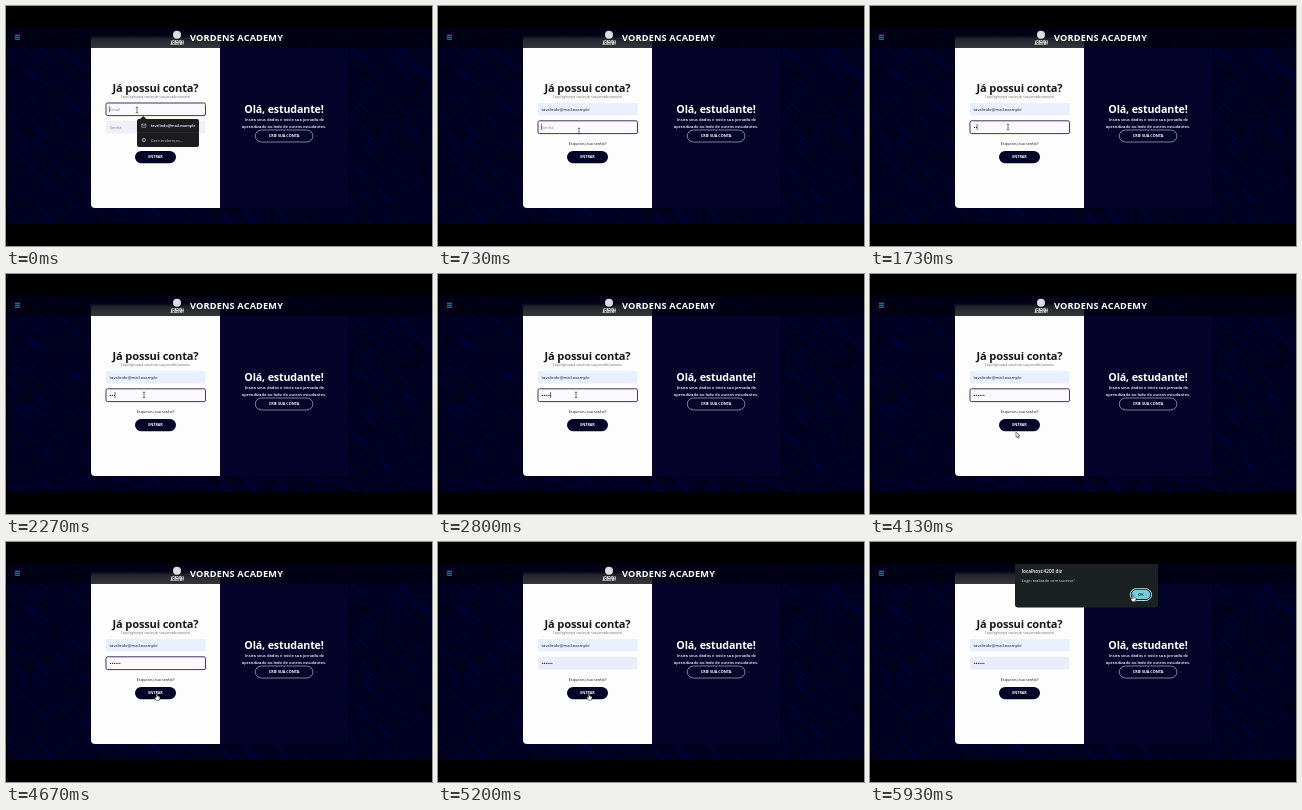
Animation of 426x240 px, one loop 5.99 s. Source, as an HTML page with a canvas:

```html
<!DOCTYPE html>
<html lang="pt">
<head>
<meta charset="utf-8">
<title>Login</title>
<style>
html, body { margin: 0; width: 100%; height: 100%; overflow: hidden; background: #000; }
canvas, svg { position: absolute; left: 0; top: 0; width: 100%; height: 100%; display: block; }
text { font-family: "Open Sans", "Noto Sans", sans-serif; fill: #fff; }
.b { font-weight: 700; }
.s { font-weight: 600; }
.title { font-weight: 700; letter-spacing: -.15px; }
.mid { text-anchor: middle; }
.ink { fill: #16161c; }
.hint { fill: #85858e; }
</style>
</head>
<body>
<canvas id="back" width="426" height="240"></canvas>
<svg viewBox="0 0 426 240" preserveAspectRatio="none">
  <defs>
    <linearGradient id="veil" x2="0" y2="1">
      <stop offset="0" stop-color="#24242c" stop-opacity="0"/>
      <stop offset=".3" stop-color="#24242c"/>
      <stop offset="1" stop-color="#35353c"/>
    </linearGradient>
  </defs>

  <path d="M213 42H342V198a4 4 0 0 1-4 4H213z" fill="#05032a"/>
  <path d="M85 42H214V202H89a4 4 0 0 1-4-4z" fill="#fdfdfd"/>
  <rect x="85" y="29" width="129" height="13" fill="url(#veil)"/>

  <path d="M9 29.2h5M9 31.2h5M9 33.2h5" stroke="#3fa3c0" stroke-width=".9"/>
  <circle cx="171" cy="28.8" r="4" fill="#ddd"/>
  <text class="b mid" x="171.3" y="36.5" font-size="2.8">VORDENS</text>
  <text class="b mid" x="171.3" y="39.3" font-size="2.8">ACADEMY</text>
  <text class="b" x="184" y="35.2" font-size="9.2" letter-spacing=".15">VORDENS ACADEMY</text>

  <text class="title mid ink" x="149.5" y="86.2" font-size="11.1">Já possui conta?</text>
  <text class="mid" x="149.5" y="92.2" font-size="3.2" style="fill:#66666c">Faça login para continuar sua jornada conosco</text>

  <rect id="mailBox" x="100" y="97" width="99.5" height="12.6" rx="1.6"/>
  <text id="mail" x="103.6" y="104.6" font-size="4.2"></text>
  <rect id="passBox" x="100" y="114.8" width="99.5" height="12.8" rx="1.6"/>
  <text id="passHint" class="hint" x="103.8" y="122.7" font-size="4.1">Senha</text>
  <g id="dots" fill="#16161c"></g>
  <path id="caret" stroke="#16161c" stroke-width=".6"/>

  <text class="mid ink" x="149.5" y="138.9" font-size="3.8">Esqueceu sua senha?</text>
  <rect x="129" y="145" width="41" height="12.2" rx="6.1" fill="#020224"/>
  <text class="b mid" x="149.5" y="152.4" font-size="3.7">ENTRAR</text>

  <text class="title mid" x="278" y="107.3" font-size="10.7">Olá, estudante!</text>
  <text class="s mid" x="278.5" y="115" font-size="4.1">Insira seus dados e inicie sua jornada de</text>
  <text class="s mid" x="278" y="122" font-size="4.1">aprendizado ao lado de outros estudantes.</text>
  <rect x="249.3" y="124" width="57.6" height="12" rx="6" fill="none" stroke="#b4b4c8" stroke-width=".7"/>
  <text class="b mid" x="278" y="131.4" font-size="3.75">CRIE SUA CONTA</text>

  <g id="menu">
    <path d="M134 113l3.2-3 3.2 3H191a2 2 0 0 1 2 2V139a2 2 0 0 1-2 2H133a2 2 0 0 1-2-2V115a2 2 0 0 1 2-2z" fill="#1c1c20"/>
    <path d="M131 126.7H193" stroke="#39393e" stroke-width=".5"/>
    <path d="M135.7 118h4.2v3.3h-4.2zl2.1 1.8 2.1-1.8" fill="none" stroke="#ddd" stroke-width=".5"/>
    <circle cx="137.8" cy="134" r="1.7" fill="none" stroke="#ccc" stroke-width=".7"/>
    <circle cx="137.8" cy="134" r=".6" fill="#ccc"/>
    <text class="s" x="144.8" y="121.2" font-size="3.75">tavelindo@mail.example</text>
    <text x="144.8" y="135.5" font-size="3.9" style="fill:#c2c2c8">Gerir endereços...</text>
  </g>

  <g id="alert">
    <path d="M145 22H288V62.5a3 3 0 0 1-3 3H148a3 3 0 0 1-3-3z" fill="#1b2022"/>
    <text class="s" x="151.8" y="30.7" font-size="4.7">localhost:4200 diz</text>
    <text x="151.8" y="39.8" font-size="3.9" style="fill:#e2e5e5">Login realizado com sucesso!</text>
    <rect x="260.2" y="46.7" width="21.4" height="11.8" rx="5.9" fill="none" stroke="#a9e6ee" stroke-width="1"/>
    <rect x="261.6" y="48.1" width="18.6" height="9" rx="4.5" fill="#78cbd9"/>
    <text class="s mid" x="270.9" y="54.1" font-size="4" style="fill:#06323a">OK</text>
  </g>

  <path id="beam" d="M-1.2 -2.7H1.2M0 -2.7V2.7M-1.2 2.7H1.2" fill="none" stroke="#222" stroke-width=".6"/>
  <path id="arrow" d="M0 0V5.4L1.3 4.3 2.2 6.2 3.1 5.8 2.2 3.9H3.9z" fill="#fff" stroke="#111" stroke-width=".5"/>
  <path id="hand" d="M-.7 -2.2a.65 .65 0 0 1 1.3 0V0L2.6 .5Q3.2 .8 3 1.8L2.3 4.3H-.6L-2.3 1.8Q-2.3 .9-1.5 1.1L-.7 1.7z" fill="#fff" stroke="#111" stroke-width=".5"/>
</svg>
<script>
const LOOP = 5990, STEP = 200 / 3;
const ADDRESS = "tavelindo@mail.example";
const $ = id => document.getElementById(id);

// Time, x, y of the pointer
const path = [
  [0, 131, 104], [260, 160, 119], [380, 160, 119], [640, 141, 125],
  [1100, 141, 125], [1500, 138, 121], [3400, 138, 121], [4000, 146, 158],
  [4300, 146, 158], [4700, 151, 154], [5520, 151, 154], [5860, 263, 55.5]
];
const keys = [1400, 1640, 2050, 2350, 2650, 3050];

const ease = p => p * p * (3 - 2 * p);

function pointer(t) {
  let i = path.length - 1;
  while (path[i][0] > t) i--;
  const a = path[i], b = path[i + 1] || a;
  const p = a === b ? 0 : ease((t - a[0]) / (b[0] - a[0]));
  return [a[1] + (b[1] - a[1]) * p, a[2] + (b[2] - a[2]) * p];
}

function show(id, on) {
  $(id).style.display = on ? "" : "none";
}

function paintField(id, focus, fill) {
  const box = $(id);
  box.setAttribute("fill", focus ? "#fbf9fd" : fill);
  box.setAttribute("stroke", focus ? "#3c3560" : "none");
  box.setAttribute("stroke-width", 1);
}

function paintBack() {
  const c = $("back").getContext("2d");
  let seed = 41;
  const rnd = () => (seed = (seed * 16807) % 2147483647) / 2147483647;
  c.beginPath();
  c.rect(1, 22, 425, 196);
  c.clip();
  c.fillStyle = "#000020";
  c.fillRect(0, 22, 426, 196);
  for (let i = 0; i < 1500; i++) {
    const x = rnd() * 446 - 20, y = 20 + rnd() * 200, len = 3 + rnd() * 10;
    const blue = rnd() < 0.6 ? 85 : 0;
    c.strokeStyle = `rgba(0,0,${blue},${0.3 + rnd() * 0.4})`;
    c.lineWidth = 0.8 + rnd() * 0.6;
    c.beginPath();
    c.moveTo(x, y);
    c.lineTo(x + len, y + len);
    c.stroke();
  }
  // Translucent page header
  c.fillStyle = "rgba(0,0,16,.65)";
  c.fillRect(0, 22, 426, 20);
}

function draw(t) {
  const filled = t >= 330, inPass = t >= 660 && t < 5000;
  const inMail = t < 660;
  const count = keys.filter(k => t >= k).length;
  const [x, y] = pointer(t);

  paintField("mailBox", inMail, "#e9f0fd");
  paintField("passBox", inPass, count ? "#ebecf8" : "#f1eff9");
  $("mail").textContent = filled ? ADDRESS : "Email";
  $("mail").setAttribute("class", filled ? "ink" : "hint");
  show("menu", !filled);
  show("passHint", !count);
  [...$("dots").children].forEach((d, i) => d.style.display = i < count ? "" : "none");

  const cx = inMail ? (filled ? 153.5 : 103.4) : 103.4 + count * 1.85;
  const cy = inMail ? 100.2 : 118;
  $("caret").setAttribute("d", `M${cx} ${cy}v6`);
  show("caret", inMail || (inPass && t < 3800));

  show("alert", t >= 5500);
  const overMenu = !filled && y > 112;
  const overField = !overMenu && x < 200 && y > 96 && y < 128;
  const overButton = (y > 145 && y < 157 && x > 129 && x < 170) || (x > 260 && y < 59);
  show("beam", overField);
  show("hand", overButton);
  show("arrow", !overField && !overButton);
  for (const id of ["beam", "hand", "arrow"])
    $(id).setAttribute("transform", `translate(${x} ${y})`);
}

for (let i = 0; i < 6; i++) {
  const d = document.createElementNS("http://www.w3.org/2000/svg", "circle");
  d.setAttribute("cx", 104.6 + i * 1.85);
  d.setAttribute("cy", 121.3);
  d.setAttribute("r", 0.65);
  $("dots").append(d);
}

paintBack();
const start = performance.now();
function tick() {
  const t = (performance.now() - start) % LOOP;
  draw(Math.floor(t / STEP) * STEP);
  requestAnimationFrame(tick);
}
tick();
</script>
</body>
</html>
```
